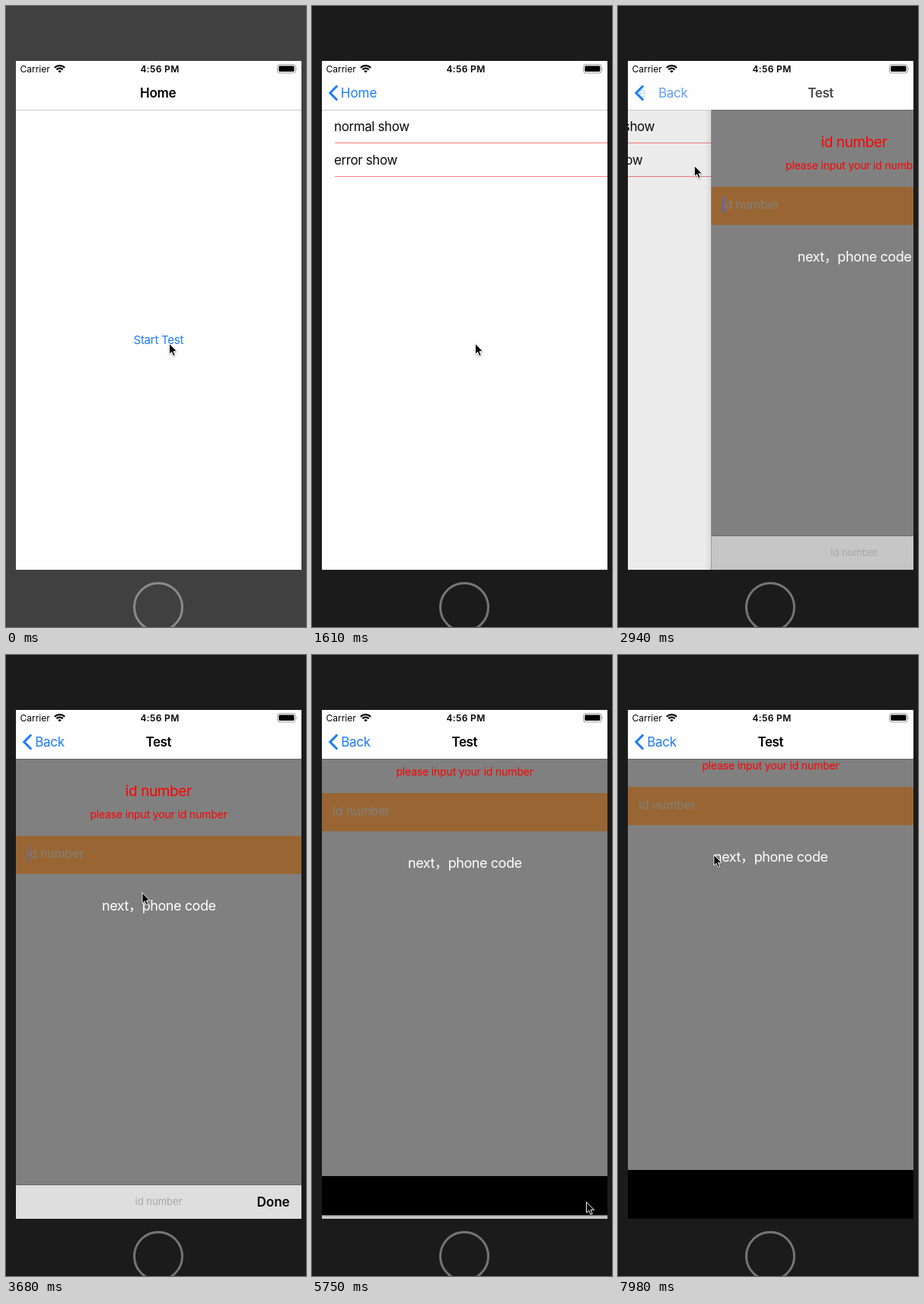
Write an HTML page that moves like this. It is 394 px wide and 814 px high and loops after 8 s.

```html
<!DOCTYPE html>
<html lang="en">
<head>
<meta charset="utf-8">
<style>
  html, body { margin: 0; width: 100%; height: 100%; overflow: hidden; background: #1b1b1b; }
  svg { display: block; width: 394px; height: 814px; }
  text { font: 400 17px Inter, "Noto Sans CJK SC", "Noto Sans CJK", sans-serif; white-space: pre; }
  .bold { font-weight: 600; }
  .mid { text-anchor: middle; }
  .blue { fill: #1c7bfa; }
  .status { font-size: 12px; }
  .row { letter-spacing: -.4px; fill: #0c0c0c; }
  .button { font-size: 15px; letter-spacing: -.26px; }
  .heading { font-size: 19px; letter-spacing: -.4px; fill: #f00; }
  .hint { font-size: 14px; letter-spacing: -.17px; fill: #f00; }
  .field { font-size: 16px; letter-spacing: -.13px; fill: #808080; }
  .next { font-size: 18px; letter-spacing: -.43px; fill: #fff; }
  .small { font-size: 13px; fill: #a6a6a6; }
</style>
</head>
<body>
<svg viewBox="0 0 394 814">
  <defs>
    <clipPath id="screen"><rect x="13" y="72" width="375" height="667"/></clipPath>
    <clipPath id="body"><rect x="13" y="137" width="375" height="602"/></clipPath>
    <clipPath id="labelClip"><rect x="27" y="95" width="361" height="40"/></clipPath>
    <linearGradient id="edge">
      <stop offset="0" stop-color="#000" stop-opacity="0"/>
      <stop offset="1" stop-color="#000" stop-opacity=".28"/>
    </linearGradient>
  </defs>

  <rect id="bezel" width="394" height="814"/>
  <circle id="homeButton" cx="200" cy="788" r="31.5" fill="none" stroke-width="3"/>
  <rect x="13" y="72" width="375" height="667" fill="#fefefe"/>

  <g clip-path="url(#body)">
    <g id="home">
      <text id="start" class="button blue mid" x="200.3" y="443.3">Start Test</text>
      <rect class="dim" x="13" y="137" width="488" height="602"/>
    </g>
    <g id="list">
      <rect class="shadow" x="4" y="137" width="9" height="602" fill="url(#edge)"/>
      <rect x="13" y="137" width="375" height="602" fill="#fefefe"/>
      <text class="row" x="29" y="163.5">normal show</text>
      <text class="row" x="29" y="207.5">error show</text>
      <path d="M30 179.5H388M30 223.5H388" stroke="#ff7f7f"/>
      <rect class="dim" x="13" y="137" width="375" height="602"/>
    </g>
    <g id="test">
      <rect class="shadow" x="4" y="137" width="9" height="602" fill="url(#edge)"/>
      <rect x="13" y="137" width="375" height="602"/>
      <g id="form">
        <rect x="13" y="137" width="375" height="602" fill="#808080"/>
        <text class="heading mid" x="200.3" y="185">id number</text>
        <text class="hint mid" x="200.5" y="213.5">please input your id number</text>
        <rect x="13" y="237" width="375" height="50" fill="#996633"/>
        <text class="field" x="27" y="266">id number</text>
        <rect id="caret" x="28" y="250" width="2" height="21" fill="#4169f0"/>
        <text class="next" x="126" y="335" lang="zh-Hans">next，</text>
        <text class="next" x="178.7" y="335">phone code</text>
      </g>
      <g id="bar">
        <rect id="barFill" x="13" y="694" width="375" height="46"/>
        <path d="M13 694.5H388" stroke="#696969"/>
        <text class="small mid" x="200.5" y="721.3">id number</text>
        <text id="done" class="bold" x="329.5" y="723">Done</text>
      </g>
    </g>
  </g>

  <path d="M13 136.5H388" stroke="#c9c9c9"/>
  <path id="darkLine" stroke="#6a6a6a"/>

  <g clip-path="url(#screen)">
    <text class="status" x="18.5" y="86.6">Carrier</text>
    <g fill="none" stroke="#000" stroke-width="2.3">
      <path d="M63.9 80.9a9.4 9.4 0 0 1 13.2 0M66.4 83.4a5.8 5.8 0 0 1 8.2 0"/>
      <path d="M70.5 87.6l-2.2-2.2a3.1 3.1 0 0 1 4.4 0z" fill="#000" stroke="none"/>
    </g>
    <text class="status bold mid" x="202" y="86.6" letter-spacing=".35">4:56 PM</text>
    <rect x="356.5" y="76.8" width="23.6" height="11" rx="2.5" fill="none" stroke="#999"/>
    <rect x="358.2" y="78.5" width="20.2" height="7.6" rx="1.3"/>
    <path d="M381.2 80.5q1.6 1.8 0 3.6z" fill="#888"/>

    <text id="homeTitle" class="bold" x="176" y="120" letter-spacing="-.25">Home</text>
    <path id="chevron" d="M33.2 104.5L23.8 114L33.2 123.5" fill="none" stroke="#1c7bfa" stroke-width="3"/>
    <g clip-path="url(#labelClip)">
      <text id="homeLabel" class="blue" x="37.8" y="120">Home</text>
      <text id="backLabel" class="blue" x="38.3" y="120" letter-spacing="-.3">Back</text>
    </g>
    <text id="testTitle" class="bold mid" x="200.3" y="120" letter-spacing="-.4">Test</text>
  </g>

  <path id="cursor" d="M.4 .4V14.6L3.6 11.6L5.8 16.8L8.2 15.8L6 10.8H10.5Z"
    stroke="#fff" style="filter:drop-shadow(0 1px 1px rgba(0,0,0,.3))"/>
</svg>

<script>
const LOOP = 8000, STEP = 147.75, LEAD = 15;
const WIDTH = 375, PARALLAX = 112.5;
const el = Object.fromEntries([...document.querySelectorAll('[id]')].map(n => [n.id, n]));

// Pointer legs in seconds: from, to, then the point reached.
const legs = [
  [1.7, 2.6, 100, 209], [3.05, 3.69, 178.5, 311], [3.69, 4.43, 360, 716.5],
  [6.05, 6.8, 54, 68], [6.8, 6.94, 51, 112], [7.3, 7.53, 75, 205], [7.7, 7.97, 125.5, 261.5]
];

const clamp = v => Math.min(1, Math.max(0, v));
const smooth = v => v * v * (3 - 2 * v);
const within = (t, from, to) => t >= from && t < to;
const move = (node, x, y = 0) => node.setAttribute('transform', `translate(${x} ${y})`);
const fade = (node, alpha) => node.setAttribute('opacity', alpha);

// Critically damped spring that settles in about 0.45 s.
function spring(t) {
  if (t <= 0) return 0;
  const x = 16.5 * t, p = 1 - (1 + x) * Math.exp(-x);
  return p > .99 ? 1 : p;
}

function pointerAt(t) {
  return legs.reduce(([x, y], [from, to, toX, toY]) => {
    const p = smooth(clamp((t - from) / (to - from)));
    return [x + (toX - x) * p, y + (toY - y) * p];
  }, [214, 442]);
}

function caretAlpha(t) {
  return t < 3.6 ? 1 : clamp(.85 + 1.4 * Math.cos(2 * Math.PI * (t - 4.43) / 1.034));
}

// A page enters from the right, then is pushed left and dimmed by the next one.
function placePage(page, entered, covered) {
  move(page, WIDTH * (1 - entered) - PARALLAX * covered);
  fade(page, entered > 0 ? 1 : 0);
  const shadow = page.querySelector('.shadow'), dim = page.querySelector('.dim');
  if (shadow) fade(shadow, 1 - entered);
  if (dim) fade(dim, .1 * covered);
}

function render(t) {
  const p = spring(t - 1.18), q = spring(t - 2.805), s = spring(t - 5.544);
  const active = t > 1.17;

  el.bezel.setAttribute('fill', active ? '#1b1b1b' : '#404040');
  el.homeButton.setAttribute('stroke', active ? '#757575' : '#8a8a8a');

  placePage(el.home, 1, p);
  placePage(el.list, p, q);
  placePage(el.test, q, 0);
  fade(el.start, within(t, 1.17, 1.3) ? .22 : 1);

  move(el.homeTitle, -138 * p);
  fade(el.homeTitle, 1 - p);
  move(el.homeLabel, 138 * (1 - p) - 69 * q);
  fade(el.homeLabel, p * (1 - q));
  fade(el.chevron, p);
  move(el.backLabel, 50 * (1 - q));
  fade(el.backLabel, q);
  move(el.testTitle, 225 * (1 - q));
  fade(el.testTitle, q);
  el.darkLine.setAttribute('d', `M${388 - WIDTH * q} 136.5H388`);

  move(el.form, 0, -64 * s);
  move(el.bar, 0, 46 * s);
  const shade = Math.round(222 - 82 * (1 - q) - 26 * s);
  el.barFill.setAttribute('fill', `rgb(${shade},${shade},${shade})`);
  fade(el.caret, s > 0 ? 0 : caretAlpha(t));
  fade(el.done, within(t, 5.3, 5.5) ? .25 : 1);

  move(el.cursor, ...pointerAt(t));
}

const began = performance.now();
function tick(now) {
  const t = Math.max(0, now - began) % LOOP;
  render(Math.floor((t + LEAD) / STEP) * STEP / 1000);
  requestAnimationFrame(tick);
}
render(0);
requestAnimationFrame(tick);
</script>
</body>
</html>
```
